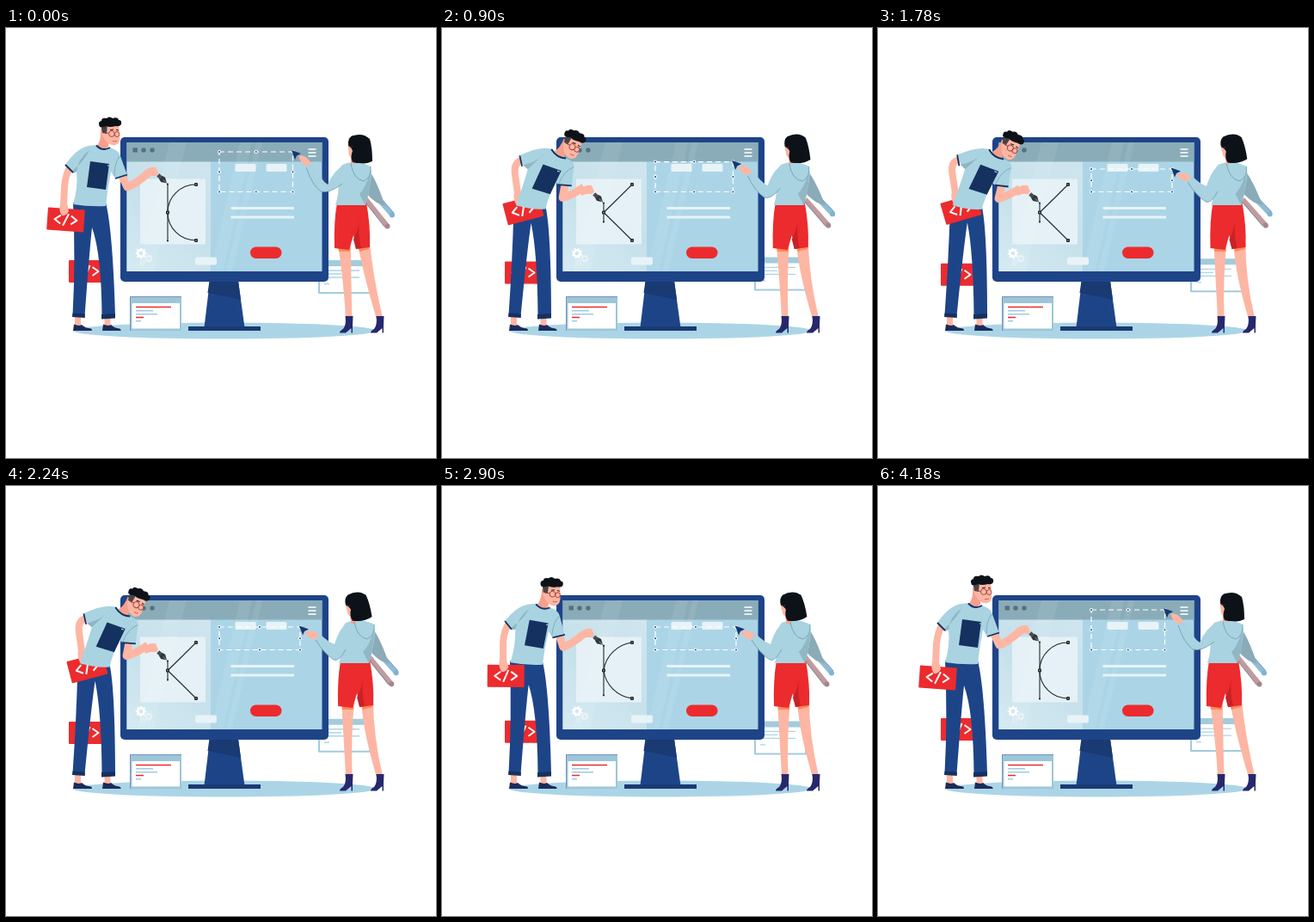
Write an HTML page with a canvas that moves like this. It is 500 px wide and 500 px high and loops after 4.2 s.

```html
<!DOCTYPE html>
<html>
<head>
<meta charset="utf-8">
<title>Design team at work</title>
<style>
html, body { margin: 0; width: 100%; height: 100%; overflow: hidden; background: #fff; }
canvas { display: block; }
</style>
</head>
<body>
<canvas id="stage" width="500" height="500"></canvas>
<script>
const ctx = document.getElementById('stage').getContext('2d');
const LOOP = 4200;
const SKY = '#abd5e6', CLOTH = '#a9d3e1', BLUE = '#1e4488', NAVY = '#15315f',
  RED = '#ec2b2e', SKIN = '#fdb6a3', BLACK = '#0d1218', PALE = '#e8f3f8', SHADE = '#8aacb9';

// Flat lists of time, value pairs
const LEAN = [0, 0, 150, .12, 440, .66, 560, .75, 1100, .95, 1320, 1, 2240, .89, 2700, .74, 2900, .17, 3150, .02, 3460, 0, 4200, 0];
const REACH = [0, 0, 440, -.03, 560, .03, 900, .58, 1320, .87, 1700, 1, 3460, 1, 3780, .93, 4140, .01, 4200, 0];
const SWING = [0, 0, 560, 0, 1080, .65, 1320, 1, 1640, .5, 2180, .1, 2900, 0, 3460, -.25, 3800, 0, 4200, 0];
const HEAD_X = [0, 0, 440, -1.5, 900, 0, 1320, 3, 1700, 0, 2240, -4, 2900, -5, 3460, 4, 3800, 3, 4200, 0];
const HEAD_TURN = [0, 0, 440, -5, 1320, -7, 2240, -9, 2900, -9, 3460, 2, 4200, 0];

// Monotone cubic interpolation
function track(keys, t) {
  const n = keys.length / 2, T = i => keys[2 * i], V = i => keys[2 * i + 1];
  const slope = i => (V(i + 1) - V(i)) / (T(i + 1) - T(i));
  const tangent = i => {
    if (i === 0 || i === n - 1) return 0;
    const a = slope(i - 1), b = slope(i);
    return a * b <= 0 ? 0 : 2 * a * b / (a + b);
  };
  let i = 0;
  while (i < n - 2 && t >= T(i + 1)) i++;
  const h = T(i + 1) - T(i), p = (t - T(i)) / h, q = 1 - p;
  return V(i) * q * q * (1 + 2 * p) + V(i + 1) * p * p * (3 - 2 * p) +
    h * p * q * (q * tangent(i) - p * tangent(i + 1));
}

const lerp = (a, b, u) => a + (b - a) * u;

// Blend two paths with the same commands
function mix(a, b, u) {
  const to = b.match(/-?[\d.]+/g);
  let i = 0;
  return a.replace(/-?[\d.]+/g, v => lerp(+v, +to[i++], u).toFixed(2));
}

function fill(d, color) {
  ctx.fillStyle = color;
  ctx.fill(new Path2D(d));
}

function line(d, color, width = 1) {
  ctx.strokeStyle = color;
  ctx.lineWidth = width;
  ctx.stroke(new Path2D(d));
}

function box(x, y, w, h, color, r = 0) {
  ctx.fillStyle = color;
  ctx.beginPath();
  ctx.roundRect(x, y, w, h, r);
  ctx.fill();
}

function dot(x, y, r, color, ry = r) {
  ctx.fillStyle = color;
  ctx.beginPath();
  ctx.ellipse(x, y, r, ry, 0, 0, 7);
  ctx.fill();
}

function placed(x, y, deg, draw) {
  ctx.save();
  ctx.translate(x, y);
  ctx.rotate(deg * Math.PI / 180);
  draw();
  ctx.restore();
}

function codeCard(x, y, deg) {
  placed(x, y, deg, () => {
    box(-21.5, -13, 43, 26, RED, 1);
    line('M-6-5L-13 0L-6 5M6-5L13 0L6 5M3-7L-3 7', '#fff', 2);
  });
}

function gear(x, y, r, turn, color) {
  placed(x, y, turn, () => {
    ctx.strokeStyle = color;
    ctx.lineWidth = r * .48;
    ctx.beginPath();
    ctx.arc(0, 0, r * .68, 0, 7);
    ctx.stroke();
    for (let i = 0; i < 8; i++) {
      ctx.rotate(Math.PI / 4);
      box(r * .9, -r * .19, r * .27, r * .38, color);
    }
  });
}

function backWindow(dy) {
  placed(0, dy, 0, () => {
    box(363, 270, 61, 39, '#a3cbdc', 1);
    box(365, 277, 57, 30, '#fff');
    line('M370 282h41M370 286h20M370 290h41M370 297.5h6', SKY, 1.3);
  });
}

function frontWindow() {
  box(144, 312, 60, 40, '#9cc6d8');
  box(146.5, 320, 55.5, 29.5, '#fff');
  line('M144.5 352V312.5H204', '#6d80bd', .8);
  line('M151 324.5h41M151 336.5h9', RED, 1.5);
  line('M151 328.7h20M151 332.7h25M151 340.7h6', '#9dcbe0', 1.5);
}

function monitor(t) {
  fill('M237 294H270L278 352H230Z', BLUE);
  fill('M236.5 294H270L273 316L234.5 308Z', '#1a3a73');
  box(212, 347, 84, 5, '#1a3a73');
  box(133, 127, 242, 168, BLUE, 5);
  box(140.5, 133, 227, 150, SKY);
  const glass = ctx.createLinearGradient(140, 283, 238, 155);
  glass.addColorStop(0, '#d6eaf2');
  glass.addColorStop(.5, '#c6e1eb');
  glass.addColorStop(1, '#cfe5ee');
  box(140.5, 155, 97.5, 128, glass);
  box(140.5, 133, 227, 22.5, SHADE);
  box(156, 175.5, 76, 76, '#e5f1f6');
  fill('M190 133h20L172 283h-20ZM272 133h14L252 283h-14ZM291 133h7L263 283h-7Z', 'rgba(255,255,255,.07)');
  box(147.5, 139.3, 5.4, 5.2, '#596f7e');
  dot(160, 142, 2.7, '#596f7e');
  dot(170, 142, 2.7, '#596f7e');
  line('M351.5 141h9M351.5 145h9M351.5 149h9', '#fff', 1.6);
  box(266.5, 158, 24, 9, PALE, 1.5);
  box(302.5, 158, 24, 9, PALE, 1.5);
  line('M261.5 209.5H335M261.5 220H335', PALE, 3);
  box(284, 254.5, 36.5, 13.5, RED, 6.7);
  box(220, 266.5, 25, 9, PALE, 2);
  const turn = t / LOOP * 90;
  gear(157, 262, 5.4, turn, '#fff');
  gear(166, 268, 4, -turn, '#e9f4f8');
  gear(159, 272.5, 3, -turn, '#e3f0f5');
}

function selection(reach) {
  const l = 248, b = 190.5, r = lerp(333.5, 342, reach), top = lerp(144, 164, reach);
  ctx.setLineDash([6, 4]);
  line(`M${l} ${top}H${r}V${b}H${l}Z`, '#fff', 1.2);
  ctx.setLineDash([]);
  const mx = (l + r) / 2, my = (top + b) / 2;
  for (const x of [l, mx, r]) for (const y of [top, my, b]) {
    if (x === mx && y === my) continue;
    dot(x, y, 2, '#fff');
    dot(x, y, 1, BLUE);
  }
}

function bezier(pen) {
  const half = lerp(33, 11, pen), ends = [214.5 - half, 214.5 + half];
  const arc = mix('M221 182C203 182 188 196 188 214.5C188 233 203 247 221 247',
    'M221 182C210 193 199 204 188 214.5C199 225 210 236 221 247', pen);
  line(arc, '#22272b', 1.1);
  line(`M188 ${ends[0]}V${ends[1]}`, '#22272b', 1.1);
  for (const y of ends) dot(188, y, 1.1, '#22272b');
  for (const [x, y] of [[221, 182], [188, 214.5], [221, 247]]) {
    box(x - 2, y - 2, 4, 4, '#22272b', 1);
    dot(x, y, .8, '#9aa5aa');
  }
}

function manHead(u) {
  placed(lerp(113, 140, u), lerp(136, 147, u), 28 * u, () => {
    ctx.translate(-113, -136);
    fill('M110 118L120 127L119 138Q114 143 106 137Q111 130 110 118Z', '#f79f8d');
    fill('M112 112H131L132 124Q134 135 126 136.5Q118 136 114 128Q110 124 112 112Z', SKIN);
    fill('M110 112H118L117 123L112 122Z', '#4a4442');
    fill('M109 115Q106 109 111 108Q111 104 117 105Q120 102 124 105Q130 103 131 107Q135 107 134 112Q132 115 128 114Q120 116 117 114Q113 116 109 115Z', BLACK);
    line('M119.5 123a3.4 3.4 0 1 0 6.8 0a3.4 3.4 0 1 0 -6.8 0M126.3 123.5a2.8 3 0 1 0 5.6 0a2.8 3 0 1 0 -5.6 0M119.5 122.5L114 121.5', '#9c3f3f', .9);
    line('M121 118.5L125 118M128 118.3L131 119', BLACK, .9);
    line('M124 131.5Q127 132.5 129 131', '#c64f49', .8);
  });
}

function manLegs(u) {
  box(80, 335, 7, 11, SKIN);
  box(114.5, 336, 7, 10, SKIN);
  fill('M79 344.5Q85 347 88 345Q92 349 99 349.5Q101 352 99 352H78Z', '#1c2b5c');
  fill('M113 344.5Q119 347 122 345Q126 349 132 349.5Q135 352 133 352H112Z', '#1c2b5c');
  fill(mix('M78 203L116 203Q124 235 127 335L111.5 336Q111 262 100 232Q97 260 91.5 335L77.5 334Q81 270 78 203Z',
    'M88 203L121 208Q127 235 127 335L111.5 336Q111 262 104 226Q99 260 91.5 335L77.5 334Q82 270 84 214Z', u), BLUE);
  fill('M77.5 331.5L91.8 332.5V337L77 336ZM111 333L127 332V337.5L111 338.5Z', NAVY);
}

function pen(dy) {
  placed(187, 180.5 + dy, 43, () => {
    fill('M0 0L-6 -3.6L-10 -2.6V2.6L-6 3.6Z', '#30363a');
    box(-14, -2.2, 5, 4.4, '#454d52');
    line('M-1 0H-6', '#a8b3b8', .8);
  });
}

function man(u, grip) {
  manLegs(u);
  // arm with the pen
  pen(22 * grip);
  line(mix('M133 168L141 185Q150 182 165 169', 'M145 180L140 199Q150 197 165 187', u), SKIN, 9);
  placed(0, 21 * grip, 0, () => fill('M160 167Q166 161 174 162L177 169L175 172L168 172L162 174Z', SKIN));
  // arm with the card
  codeCard(lerp(69.5, 97.5, u), lerp(223, 210, u), lerp(4, -17, u));
  line(mix('M76 159Q69 170 68 184L67 206', 'M95 153Q85 155 87 168L91 193', u), SKIN, 8);
  fill(mix('M63 204Q67 202 71 204L73 213Q70 219 65 218Q61 213 63 204Z',
    'M86 192Q91 190 95 192L98 200Q97 206 91 206Q86 202 86 192Z', u), SKIN);
  manHead(u);
  fill(mix('M106 136Q112 143 121 139Q131 142 133 149L141 171L127 175L122 167Q118 187 116 207Q97 208 78 205Q84 185 82 167L78 169L69 159Q82 140 96 137Z',
    'M131 141Q136 151 147 153Q157 156 156 163L152 185L136 183L134 181Q124 197 121 211Q104 212 87 206Q94 188 102 164L97 159L93 147Q110 140 122 140Z', u), CLOTH);
  fill(mix('M97 142Q83 153 82 167L78 169L76 167Q91 155 97 142Z',
    'M125 143Q113 155 102 164L97 159L95 159Q114 156 125 143Z', u), '#8fb5c2');
  line(mix('M69 159L78 168M127 175L141 170.5', 'M93 147L95 160M136 183L152 185', u), NAVY, 1.8);
  line(mix('M105 136.5Q112 144 121 139', 'M130 141.5Q136 152 147 153', u), NAVY, 2);
  line(mix('M132 149Q126 157 126 172', 'M156 163Q144 167 137 182', u), '#6f9cac', .7);
  fill(mix('M98 155L120 158L116 188L94 185Z', 'M120 159L141 167L127 194L106 187Z', u), NAVY);
  line(mix('M118 160L120 160', 'M136 167L139 168', u), '#dcecf2', 1);
}

function womanLegs(d) {
  const top = x => x + d;
  fill(`M${top(386)} 250H${top(401)}Q401 290 402.5 337H395Q393 300 ${top(386)} 250Z`, SKIN);
  fill(`M${top(409)} 250H${top(423)}Q427 290 438 337H430.5Q415 285 ${top(409)} 250Z`, SKIN);
  fill(`M${top(386)} 253H${top(400)}V260H${top(387)}ZM${top(409)} 253H${top(422)}V257L${top(411)} 260Z`, '#ff8a52');
  const boot = 'M394.5 335H403.5L403 346L403 354.5H401.5V349L395 354.5H388Q388 352 392 350Q396 345 394.5 335Z';
  fill(boot, '#26286c');
  placed(36, 0, 0, () => fill(boot, '#26286c'));
}

function womanHead(x, turn) {
  placed(407 + x, 157, turn, () => {
    ctx.translate(-407, -157);
    fill('M401 145H412V160Q406 163 401 158Z', '#f79f8d');
    fill('M399 134Q397 139 398.5 143Q398 150 403 151L409 150V132Z', SKIN);
    fill('M398 137Q397 129 402 125.5Q415 121 423 129Q426 139 426 155Q416 160 403 156Q400 150 403 143Q402 139 398 137Z', BLACK);
    line('M398 135Q402 141 403 137', '#3a3f46', .7);
  });
}

function woman(w, s, t) {
  const d = 4 * w + 1.3 * s;
  womanLegs(d);
  placed(d, 0, 0, () => {
    // rolled sheets under the far arm
    placed(424, 165, -7 * s, () => {
      ctx.translate(-424, -165);
      line('M418 199L443 230', '#c29b9f', 6);
      line('M417 201L440 231', '#7f929d', 1);
      line('M419 183L449 217', '#8fbdd6', 6);
      line('M422 182L451 215', '#7187b6', .8);
      dot(449, 217.5, 3, '#7db3d4');
      dot(443.5, 230.5, 3, '#a7858d');
      fill('M420 163Q429 172 441 207L431 203Q421 196 416 188Z', '#8aabb7');
    });
    fill('M385 203H419Q424 230 423 255L407 257L404 241L399 258L382 256Q381 225 385 203Z', RED);
    fill('M411 222Q410 235 404 246L407 257L413 256Q409 240 411 222Z', '#c92126');
    fill('M391 159Q402 154 413 157Q423 160 425 167Q424 186 418 206H383Q388 190 386 178Q385 165 391 159Z', CLOTH);
    fill('M424 167Q418 186 411 193Q415 201 418 206Q424 186 424 167Z', '#92b7c4');
  });
  womanHead(track(HEAD_X, t) + d, track(HEAD_TURN, t));
  placed(d, 0, 0, () => {
    fill('M401 158Q413 155 424 161Q426 174 416 178Q405 176 401 158Z', CLOTH);
    line('M401 158Q404 176 416 178Q425 174 424 161', '#6d9bad', .8);
  });
  fill(mix('M394 159Q382 164 374 182Q366 177 357 157L349 162Q356 183 366 190Q376 193 391 181Z',
    'M398 159Q388 164 382 184Q374 181 365 172L360 179Q369 194 381 202Q387 205 395 190Z', w), CLOTH);
  line(mix('M349 162Q356 183 366 190Q376 193 391 181', 'M360 179Q369 194 381 202Q387 205 395 190', w), '#6d9bad', .8);
  placed(lerp(332, 341, w), lerp(142, 162.5, w), 0, () => fill('M0 0L11 4L6 6.5L4 11Z', '#17376f'));
  fill(mix('M340 149Q345 147 350 151L355 157L350 161Q343 158 340 149Z',
    'M347 170Q354 167 360 170L364 173L360 178Q352 179 347 170Z', w), SKIN);
}

function frame() {
  const t = performance.now() % LOOP, phase = t / LOOP * 2 * Math.PI;
  const lean = track(LEAN, t), grip = Math.min(1, lean * 1.13), reach = track(REACH, t);
  ctx.clearRect(0, 0, 500, 500);
  ctx.lineJoin = 'round';
  dot(254, 352, 176, SKY, 9.5);
  codeCard(94.5, 283 + 2 * (1 - Math.cos(phase)), 0);
  backWindow(-3.7 * Math.sin(phase));
  monitor(t);
  frontWindow();
  selection(reach);
  bezier(grip);
  man(lean, grip);
  woman(reach, track(SWING, t), t);
  requestAnimationFrame(frame);
}
frame();
</script>
</body>
</html>
```
